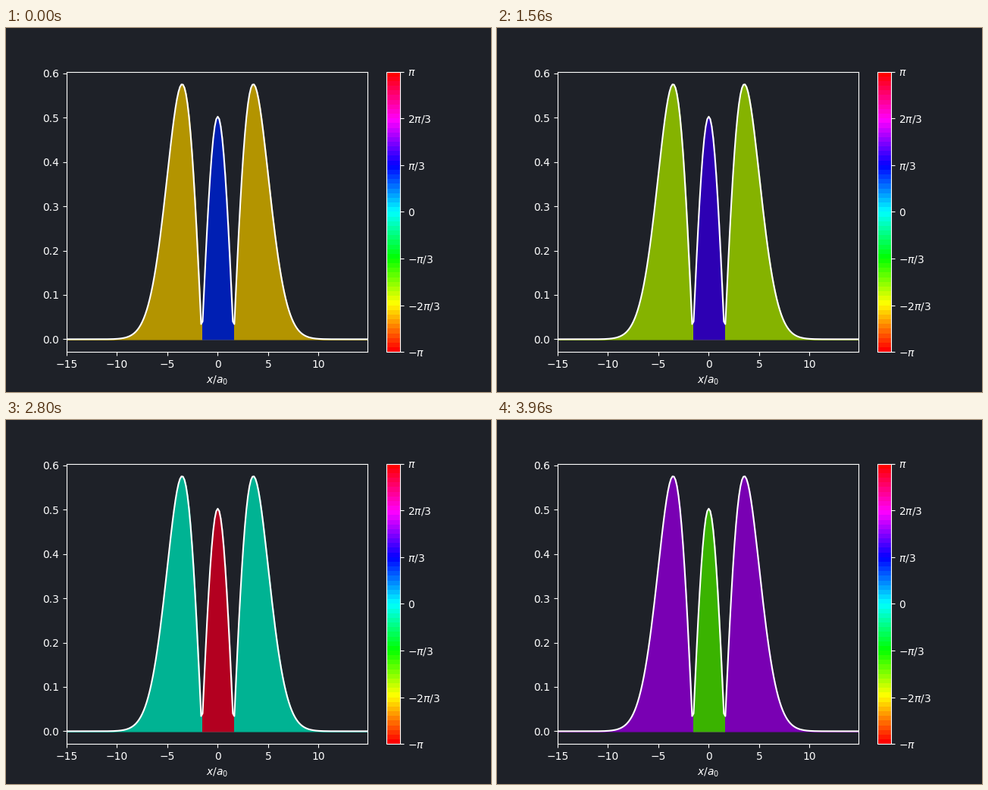
Write a matplotlib script that moves like this. It is 640 px wide and 480 px high and loops after 4000 ms.

```python
import numpy as np
import matplotlib.pyplot as plt
from matplotlib.animation import FuncAnimation
from matplotlib.cm import ScalarMappable
from matplotlib.colors import ListedColormap, Normalize, hsv_to_rgb
from matplotlib.patches import Rectangle

FRAMES = 100
INTERVAL = 40
BG = "#1e2128"
HUE_START = 49.6   # degrees
HUE_STEP = -8.576  # degrees per frame

plt.style.use("dark_background")
plt.rcParams.update({"font.family": "DejaVu Sans", "figure.facecolor": BG,
                     "axes.facecolor": BG, "savefig.facecolor": BG})

# Second excited state of a harmonic oscillator
x = -15 + 0.15 * np.arange(200)
xi = x / np.sqrt(5)
psi = (4 * xi**2 - 2) * np.exp(-xi**2 / 2)
psi *= np.sqrt(2) / np.sqrt(8 * np.sqrt(5 * np.pi))
amp = np.abs(psi)

fig, ax = plt.subplots(figsize=(6.4, 4.8), dpi=100)
ax.set_xlim(x[0], x[-1])
ax.set_ylim(-0.05 * amp.max(), 1.05 * amp.max())
ax.set_xlabel("$x/a_0$")

outer = ax.fill_between(x, amp, linewidth=1)
inner = ax.fill_between(x, amp, linewidth=1)
node = 10.5 * (x[-1] - x[0]) / len(x)
mid = (x[0] + x[-1]) / 2 + 0.5 * (x[-1] - x[0]) / len(x)
inner.set_clip_path(Rectangle((mid - node, -1), 2 * node, 3,
                              transform=ax.transData))
ax.plot(x, amp, color="white", linewidth=1.5)

hues = np.linspace(0, 1, 60)
wheel = ListedColormap([hsv_to_rgb((h, 1, 1)) for h in hues])
bar = fig.colorbar(ScalarMappable(Normalize(-np.pi, np.pi), wheel), ax=ax)
bar.set_ticks(np.pi * np.arange(-3, 4) / 3)
bar.set_ticklabels([r"$-\pi$", r"$-2\pi/3$", r"$-\pi/3$", "$0$",
                    r"$\pi/3$", r"$2\pi/3$", r"$\pi$"])


def shade(degrees):
    return hsv_to_rgb((degrees % 360 / 360, 1, 0.7))


def update(i):
    hue = HUE_START + HUE_STEP * i
    outer.set_color(shade(hue))
    inner.set_color(shade(hue + 180))
    return outer, inner


anim = FuncAnimation(fig, update, frames=FRAMES, interval=INTERVAL,
                     init_func=lambda: update(0), repeat=True,
                     repeat_delay=0, blit=False)
plt.show()
```
